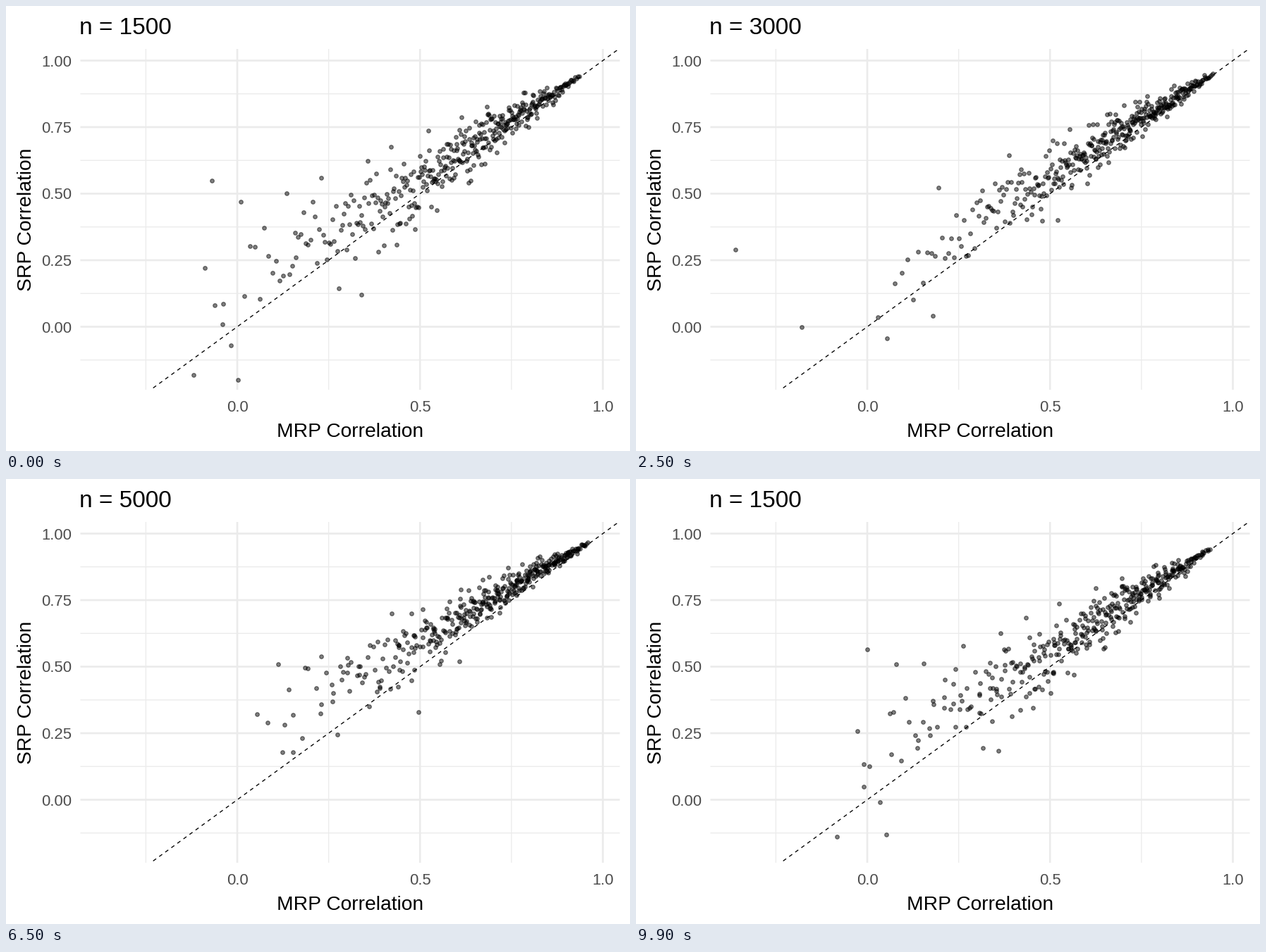
Animation, 885 px wide and 632 px high, one loop 10000 ms. Source, as a matplotlib script:

```python
import numpy as np
import matplotlib.pyplot as plt
from matplotlib.animation import FuncAnimation
from matplotlib.patches import Rectangle

W, H, DPI = 885, 632, 100
PT = 72 / DPI                      # points per pixel
LEFT, RIGHT, TOP, BOTTOM = 105.5, 870.5, 61, 545
SIZES = (1500, 3000, 5000, 10000)
HOLD, STEPS, CYCLE = 14, 11, 25    # frames
BULK = 394
rng = np.random.default_rng(12)

# Key strays in data units: one row per point, one place per sample size.
STRAYS = np.array([
    [(-.12, -.18), (.18, .04), (.14, .17), (.28, .27)],
    [(-.07, .55), (.63, .60), (.60, .50), (.69, .72)],
    [(.01, .47), (.42, .59), (.41, .55), (.76, .89)],
    [(-.04, .01), (-.18, .00), (.03, .31), (.30, .43)],
    [(.16, .26), (-.36, .29), (.17, .22), (.26, .35)],
    [(.34, .12), (.52, .40), (.49, .28), (.55, .81)],
])


def px(x):
    return 328 + 518.5 * np.asarray(x)


def py(y):
    return 455.5 - 378 * np.asarray(y)


base = rng.random(BULK)
shared = rng.standard_t(6, BULK)


def cloud(top, scale, lift, spread):
    """Points thinning out below `top`, wider and higher off the diagonal there."""
    rank = np.argsort(np.argsort(base + rng.normal(0, 0.06, BULK)))
    gap = scale * (-np.log((rank + 5) / (BULK + 5))) ** 0.64
    noise = 0.5 * shared + 0.7 * rng.standard_t(6, BULK)
    x = top - gap
    y = x + 0.004 + lift * gap + spread * gap ** 0.8 * np.clip(noise, -2.6, 2.6)
    return np.column_stack([x, y])


CLOUDS = [cloud(.945, .402, .11, .125), cloud(.953, .359, .14, .105),
          cloud(.970, .360, .20, .105), cloud(.978, .272, .26, .10)]


def to_stage(points):
    return np.column_stack([px(points[:, 0]), py(points[:, 1])])


STATES = [to_stage(np.vstack([c, STRAYS[:, i]])) for i, c in enumerate(CLOUDS)]

plt.rcParams["font.family"] = "Liberation Sans"
fig = plt.figure(figsize=(W / DPI, H / DPI), dpi=DPI, facecolor="white")
ax = fig.add_axes([0, 0, 1, 1])
ax.set_xlim(0, W)
ax.set_ylim(H, 0)
ax.axis("off")


def grid(xs, ys, width):
    style = dict(colors="#EBEBEB", linewidths=width * PT, zorder=1, snap=False)
    ax.vlines(px(xs), TOP, BOTTOM, **style)
    ax.hlines(py(ys), LEFT, RIGHT, **style)


def label(x, y, text, size, color="black", **kw):
    return ax.text(x, y, text, fontsize=size * PT, color=color,
                   va="baseline", **kw)


X_TICKS = np.arange(3) / 2
Y_TICKS = np.arange(5) / 4
grid(X_TICKS - 0.25, Y_TICKS - 0.125, 1.33)
grid(X_TICKS, Y_TICKS, 2.67)

for x in X_TICKS:
    label(px(x), 576, f"{x:.1f}", 22.2, "#4D4D4D", ha="center")
for y in Y_TICKS:
    label(93.3, py(y) + 8, f"{y:.2f}", 22.2, "#4D4D4D", ha="right")
label(488, 612, "MRP Correlation", 28.3, ha="center")
label(36, 303, "SRP Correlation", 28.3, ha="center", rotation=90,
      rotation_mode="anchor")
title = label(104.5, 40, "", 33.4, ha="left")

dots = ax.scatter(*STATES[0].T, s=(5.6 * PT) ** 2, linewidths=1.2 * PT,
                  facecolors=(0, 0, 0, 0.5), edgecolors=(0, 0, 0, 0.5),
                  zorder=2)
panel = Rectangle((LEFT, TOP), RIGHT - LEFT, BOTTOM - TOP,
                  transform=ax.transData)
ends = (np.array([LEFT, RIGHT]) - 328) / 518.5
diagonal, = ax.plot(px(ends), py(ends), color="black", lw=1.33 * PT, zorder=3,
                    dashes=(4, 4), dash_capstyle="butt")
diagonal.set_clip_path(panel)


def draw(frame):
    now, tick = divmod(frame, CYCLE)
    after = (now + 1) % len(STATES)
    p = max(0, tick - HOLD) / STEPS
    dots.set_offsets(STATES[now] * (1 - p) + STATES[after] * p)
    title.set_text(f"n = {SIZES[after if p > 0.5 else now]}")
    return dots, title


anim = FuncAnimation(fig, draw, frames=CYCLE * len(STATES), interval=100,
                     repeat=True, repeat_delay=0)
plt.show()
```
